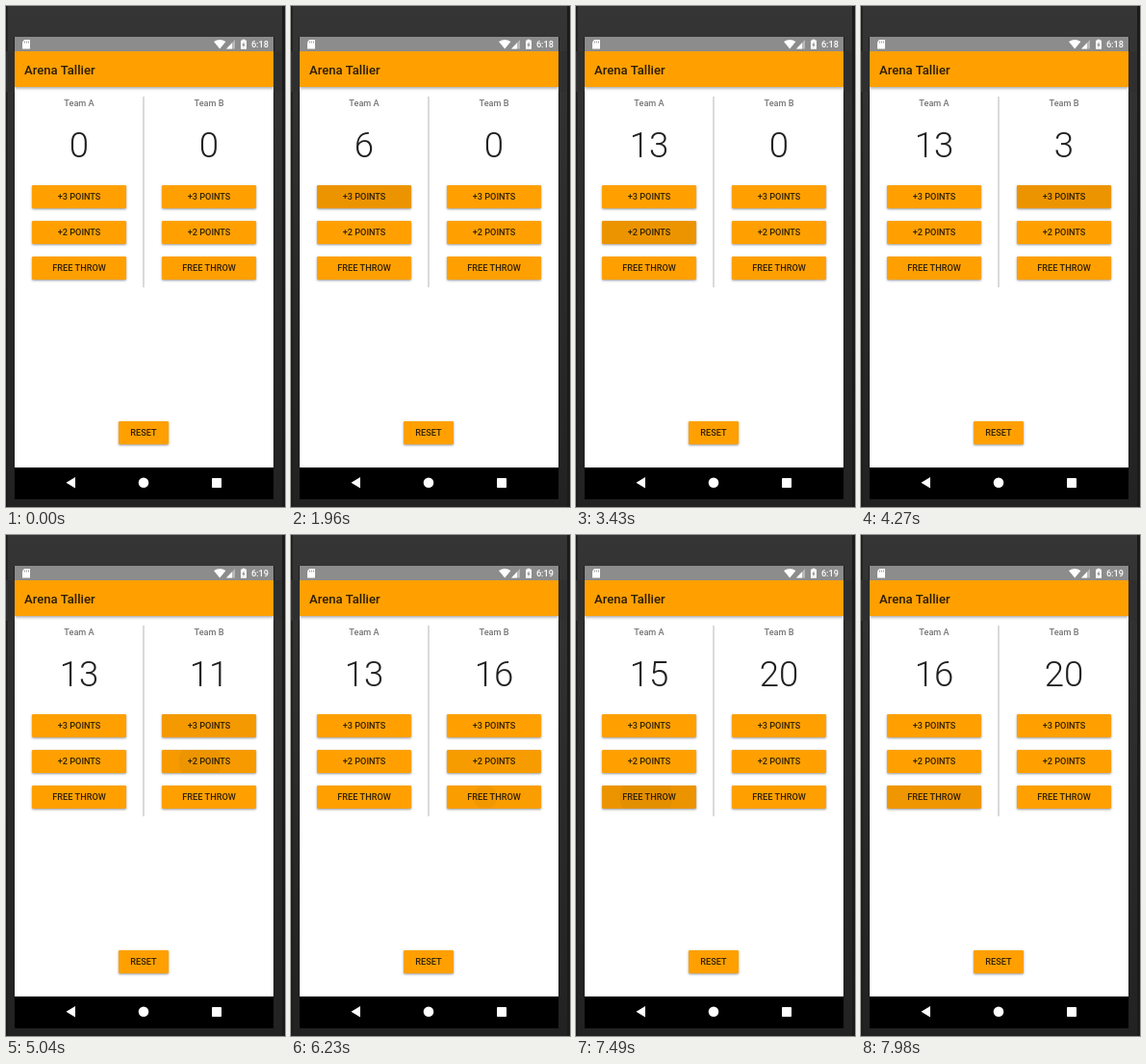
These frames come from a looping animation (290x520 px, 8 s). An HTML page with a canvas:

```html
<!DOCTYPE html>
<html lang="en">
<head>
<meta charset="utf-8">
<title>Arena Tallier</title>
<style>
html, body { margin: 0; width: 100%; height: 100%; overflow: hidden; background: #292929; }
canvas { display: block; width: 290px; height: 520px; }
</style>
</head>
<body>
<canvas id="stage"></canvas>
<script>
const W = 290, H = 520, LOOP = 8000, STEP = 70;
const ORANGE = '#ffa000', INK = '#302006';
const canvas = document.getElementById('stage');
const ctx = canvas.getContext('2d');
const dpr = window.devicePixelRatio || 1;
canvas.width = W * dpr;
canvas.height = H * dpr;
ctx.scale(dpr, dpr);

const TEAMS = [{ name: 'Team A', x: 27 }, { name: 'Team B', x: 162 }];
const ROWS = [
  { label: '+3 POINTS', y: 186, points: 3 },
  { label: '+2 POINTS', y: 223, points: 2 },
  { label: 'FREE THROW', y: 260, points: 1 }
];
const BUTTON = { w: 98, h: 24 };
const CLICK_DELAY = 45;

// [touch start, team, row]
const PRESSES = [
  [1300, 0, 0], [1700, 0, 0], [2200, 0, 0], [2720, 0, 1], [3170, 0, 1],
  [4010, 1, 0], [4290, 1, 0], [4570, 1, 0], [4950, 1, 1],
  [5330, 1, 1], [5700, 1, 1],
  [6180, 1, 2], [6340, 1, 2], [6490, 1, 2], [6640, 1, 2], [6850, 1, 2],
  [7200, 0, 2], [7380, 0, 2], [7560, 0, 2]
].map(([start, team, row]) => ({ start, team, row }));

const clamp = v => Math.max(0, Math.min(1, v));

function rect(x, y, w, h, fill) {
  ctx.fillStyle = fill;
  ctx.fillRect(x, y, w, h);
}

function roundRect(x, y, w, h, r) {
  ctx.beginPath();
  ctx.roundRect(x, y, w, h, r);
}

function poly(points, fill) {
  ctx.fillStyle = fill;
  ctx.beginPath();
  points.forEach(([x, y]) => ctx.lineTo(x, y));
  ctx.fill();
}

function text(str, x, y, size, weight, fill, align = 'center') {
  ctx.font = `${weight} ${size}px Roboto, sans-serif`;
  ctx.textAlign = align;
  ctx.fillStyle = fill;
  ctx.fillText(str, x, y);
}

function withShadow(blur, offset, alpha, draw) {
  ctx.save();
  ctx.shadowColor = `rgba(0,0,0,${alpha})`;
  ctx.shadowBlur = blur * dpr;
  ctx.shadowOffsetY = offset * dpr;
  draw();
  ctx.restore();
}

function phone() {
  const body = ctx.createLinearGradient(0, 0, 0, H);
  body.addColorStop(0, '#353535');
  body.addColorStop(0.5, '#2b2b2b');
  body.addColorStop(1, '#222');
  rect(0, 0, W, H, body);
  rect(0, 0, 1.5, H, '#1b1b1b');
  rect(287, 0, 3, H, '#1b1b1b');
  rect(8, 32, 1, 480, '#202020');
  rect(278, 32, 1, 480, '#202020');
  rect(9, 32, 269, 447, '#fff');
  rect(9, 479, 269, 33, '#000');
}

function statusBar(clock) {
  rect(9, 32, 269, 15, '#8c8c8c');
  poly([[19, 35], [25, 35], [25, 44.5], [17, 44.5], [17, 37.5]], '#fff');
  [19, 21, 23].forEach(x => rect(x, 36.5, 0.8, 2, '#8c8c8c'));

  ctx.fillStyle = '#fff';
  ctx.beginPath();
  ctx.moveTo(222.2, 44.5);
  ctx.lineTo(216, 37);
  ctx.quadraticCurveTo(222.2, 32.8, 228.4, 37);
  ctx.fill();

  poly([[238, 35], [238, 44.5], [229, 44.5]], '#b9b9b9');
  poly([[235, 38.2], [235, 44.5], [229, 44.5]], '#fff');

  rect(245.5, 34.7, 3, 1.5, '#fff');
  rect(244, 35.7, 6, 9, '#fff');
  poly([[247.6, 37], [245.3, 40.8], [246.7, 40.8], [246.4, 43.5], [248.7, 39.7], [247.3, 39.7]], '#8c8c8c');
  text(clock, 273, 43.1, 9.2, 500, '#fff', 'right');
}

function appBar() {
  withShadow(3, 1.5, 0.35, () => rect(9, 47, 269, 37, ORANGE));
  rect(0, 47, 9, 42, '#2f2f2f');
  rect(278, 47, 9, 42, '#2f2f2f');
  text('Arena Tallier', 19, 70.5, 13.1, 500, '#2a1d06', 'left');
}

function navBar() {
  poly([[62.5, 494.7], [72, 489], [72, 500.4]], '#fff');
  ctx.beginPath();
  ctx.arc(143, 494.8, 5.3, 0, 7);
  ctx.fill();
  roundRect(214, 490, 10, 10, 0.8);
  ctx.fill();
}

function ripples(x, y, presses, t) {
  ctx.save();
  roundRect(x, y, BUTTON.w, BUTTON.h, 1.3);
  ctx.clip();
  let glow = 0;
  for (const { start, team } of presses) {
    const age = t - start;
    if (age < 0 || age > 650) continue;
    const fade = 1 - clamp((age - 350) / 300);
    glow = Math.max(glow, fade * clamp(age / 100));
    ctx.fillStyle = `rgba(0,0,0,${0.035 * fade})`;
    ctx.beginPath();
    ctx.arc(x + (team ? 40 : 46), y + 12, age / 4, 0, 7);
    ctx.fill();
  }
  rect(x, y, BUTTON.w, BUTTON.h, `rgba(0,0,0,${0.04 * glow})`);
  ctx.restore();
}

function button(label, x, y, w, presses, t) {
  withShadow(2.5, 1, 0.4, () => {
    roundRect(x, y, w, BUTTON.h, 1.3);
    ctx.fillStyle = ORANGE;
    ctx.fill();
  });
  if (presses.length) ripples(x, y, presses, t);
  text(label, x + w / 2, y + 15.3, 9.16, 500, INK);
}

function draw(t) {
  phone();
  statusBar(t < 4410 ? '6:18' : '6:19');
  appBar();
  rect(142.5, 94, 1, 198, '#b5b5b5');

  TEAMS.forEach((team, i) => {
    const own = PRESSES.filter(p => p.team === i);
    const score = own.filter(p => t >= p.start + CLICK_DELAY)
      .reduce((sum, p) => sum + ROWS[p.row].points, 0);
    const center = team.x + BUTTON.w / 2;
    text(team.name, center, 104.3, 9.16, 500, '#757575');
    text(score, center, 157, 36.6, 300, '#202020');
    ROWS.forEach((row, r) =>
      button(row.label, team.x, row.y, BUTTON.w, own.filter(p => p.row === r), t));
  });

  button('RESET', 117, 431, 52, [], t);
  navBar();
}

const origin = performance.now();
function frame() {
  const t = (performance.now() - origin) % LOOP;
  draw(Math.floor(t / STEP) * STEP);
  requestAnimationFrame(frame);
}
frame();
</script>
</body>
</html>
```
